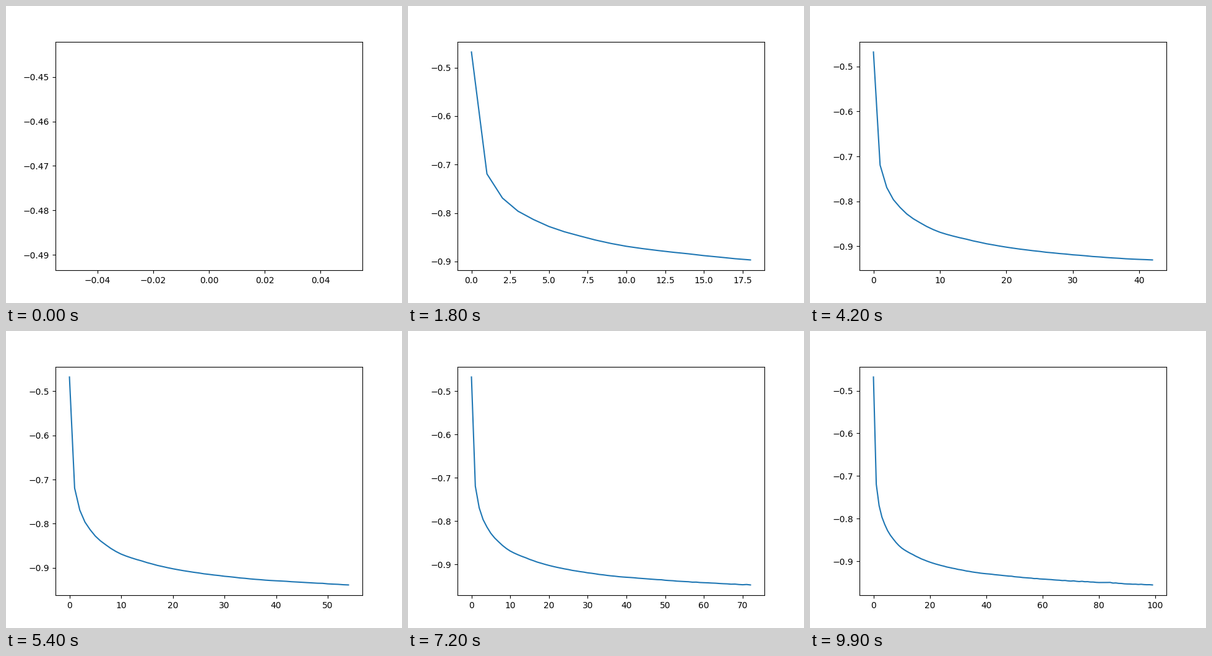
A matplotlib script for the animation above (10000 ms loop, 640x480 px).

```python
import numpy as np
import matplotlib.pyplot as plt
from matplotlib.animation import FuncAnimation

FRAMES = 100
INTERVAL = 100
START = -0.46777

# The gap to a perfect score of -1 follows nearly a power law of the step
KNOTS = [1, 2, 4, 7, 10, 14, 20, 31, 36, 45, 60, 72, 83, 99]
GAPS = [0.2807, 0.2308, 0.1865, 0.1525, 0.1312, 0.1157, 0.0981,
        0.0800, 0.0739, 0.0675, 0.0582, 0.0531, 0.0500, 0.0443]


def make_scores():
    n = np.arange(1, FRAMES)
    gap = np.exp(np.interp(np.log(n), np.log(KNOTS), np.log(GAPS)))
    # Training noise that grows as the curve flattens
    noise = np.random.default_rng(4).normal(0, 0.0004, n.size) * n / FRAMES
    return np.concatenate([[START], gap - 1 + noise])


steps = np.arange(FRAMES)
scores = make_scores()

fig, ax = plt.subplots(figsize=(6.4, 4.8), dpi=100)


def draw(n):
    ax.clear()
    return ax.plot(steps[:n + 1], scores[:n + 1], color="tab:blue", lw=1.5)


anim = FuncAnimation(fig, draw, frames=FRAMES, init_func=lambda: draw(0),
                     interval=INTERVAL, repeat=True, repeat_delay=0)
plt.show()
```
